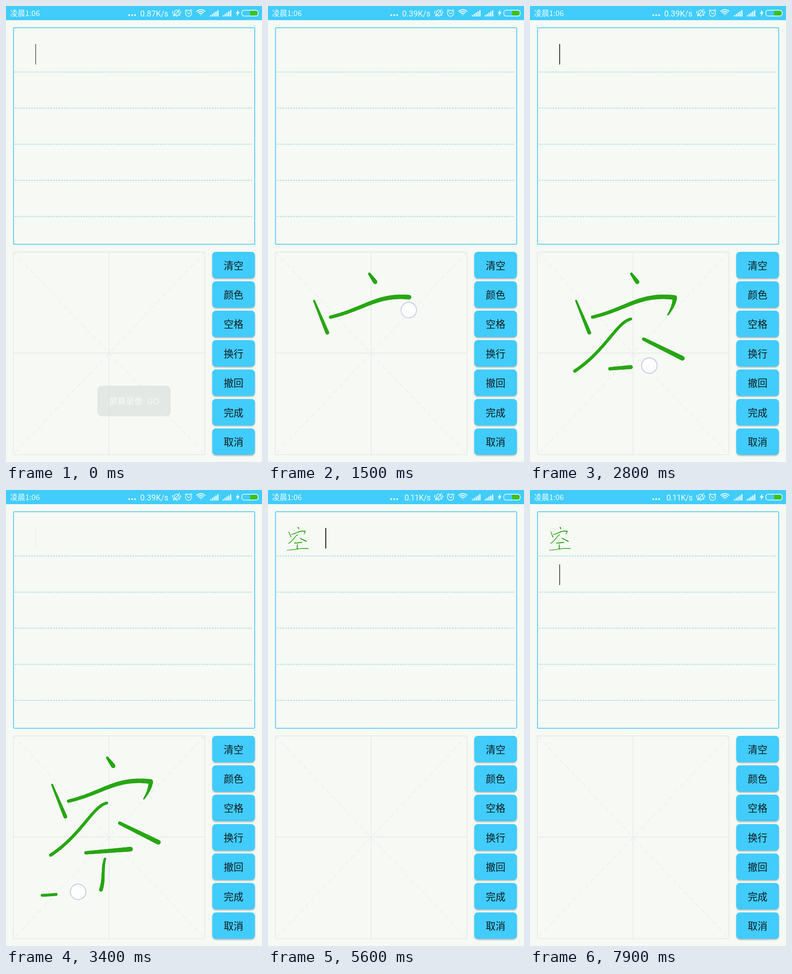
These frames come from a looping animation (561 px wide and 998 px high, 8000 ms). An HTML page with a canvas:

```html
<!DOCTYPE html>
<html lang="zh-CN">
<head>
<meta charset="utf-8">
<title>手写输入</title>
<style>
html, body { margin: 0; width: 561px; height: 998px; overflow: hidden; background: #f6f9f4; }
canvas { display: block; }
</style>
</head>
<body>
<canvas id="stage" width="561" height="998"></canvas>
<script>
const ctx = document.getElementById('stage').getContext('2d');
const CJK = '"Noto Sans CJK SC", "Noto Sans CJK", sans-serif';
const PAGE = '#f6f9f4', INK = '#28a614', BLUE = '#41ccfb', WHITE = '#f4fcff';
const LOOP = 8000, STEP = 100, INK_LAG = 70;
const COMMIT = 5000, NEWLINE = 6800;

// A pen stroke is a Bezier curve over its key points; the width runs from w0 to w1.
const stroke = (start, end, w0, w1, ...points) => ({ start, end, w0, w1, points });
const strokes = [
  stroke(700, 830, 5, 9, [222, 586], [235, 604]),
  stroke(960, 1080, 4, 8, [101, 645], [130, 715]),
  stroke(1150, 1440, 7, 10, [137, 681], [215, 662], [240, 629], [317, 638]),
  stroke(1440, 1520, 10, 3, [317, 638], [317, 654], [302, 676]),
  stroke(1620, 2110, 6, 7, [221, 685], [190, 692], [165, 755], [98, 799]),
  stroke(2340, 2510, 7, 10, [249, 729], [334, 771]),
  stroke(2650, 2820, 7, 10, [175, 794], [273, 786]),
  stroke(2960, 3120, 5, 8, [217, 807], [210, 830], [216, 850], [208, 875]),
  stroke(3280, 3700, 6, 8, [79, 887], [160, 885], [290, 851], [361, 868])
];

const clamp = v => Math.max(0, Math.min(1, v));
const mix = (a, b, u) => a + (b - a) * u;

function bezier(points, u) {
  if (points.length === 1) return points[0];
  return bezier(points.slice(1).map(([x, y], i) => [mix(points[i][0], x, u), mix(points[i][1], y, u)]), u);
}

function line(points, color, width = 1, dash = []) {
  ctx.strokeStyle = color;
  ctx.lineWidth = width;
  ctx.setLineDash(dash);
  ctx.beginPath();
  points.forEach(([x, y]) => ctx.lineTo(x, y));
  ctx.stroke();
  ctx.setLineDash([]);
}

function box(x, y, w, h, r, fill, outline, width = 1) {
  ctx.beginPath();
  ctx.roundRect(x, y, w, h, r);
  if (fill) { ctx.fillStyle = fill; ctx.fill(); }
  if (outline) { ctx.strokeStyle = outline; ctx.lineWidth = width; ctx.stroke(); }
}

function dot(x, y, r, color) {
  ctx.fillStyle = color;
  ctx.beginPath();
  ctx.arc(x, y, r, 0, 2 * Math.PI);
  ctx.fill();
}

function text(str, x, y, size, color, align = 'center', family = CJK) {
  ctx.font = `${size}px ${family}`;
  ctx.textAlign = align;
  ctx.fillStyle = color;
  ctx.fillText(str, x, y);
}

const bell = new Path2D('M369 17v-3a5 5 0 0 1 10 0v3l2 3h-14zM372 22.5h4M381 7l-14 16M366 11q-2 3 0 6M382 11q2 3 0 6');
const clock = new Path2D('M393.2 16a6.8 6.8 0 1 0 13.6 0a6.8 6.8 0 1 0-13.6 0M397 14l3 3 4-2M392 11l4-3.5M404 7.5l4 3.5');
const bolt = new Path2D('M509 8l-5.5 8.5h3.5l-1.5 6.5 6.5-9.5h-3.7z');

function drawStatus(t) {
  ctx.fillStyle = BLUE;
  ctx.fillRect(0, 0, 561, 31);
  text('凌晨1:06', 9, 22, 16.5, WHITE, 'left');
  const rate = t < 400 ? '0.87' : t < 4400 ? '0.39' : '0.11';
  ctx.letterSpacing = rate === '0.11' ? '-0.7px' : '0px';
  text(rate + 'K/s', 356, 22.5, 17.7, WHITE, 'right', 'Roboto, sans-serif');
  ctx.letterSpacing = '0px';

  for (let i = 0; i < 3; i++) dot(270 + i * 6.5, 20, 2, WHITE);
  ctx.strokeStyle = ctx.fillStyle = WHITE;
  ctx.lineWidth = 1.4;
  ctx.stroke(bell);
  ctx.stroke(clock);
  ctx.fill(bolt);

  // wifi
  ctx.lineWidth = 2.2;
  for (let r = 1; r <= 13; r += 4) {
    ctx.beginPath();
    ctx.arc(427, 21, r, -Math.PI * 0.76, -Math.PI * 0.24);
    ctx.stroke();
  }

  // signal bars
  for (const x of [447, 475])
    for (let i = 0; i < 5; i++) ctx.fillRect(x + i * 4, 20 - i * 2.7, 2.6, 3 + i * 2.7);

  // battery
  box(516.7, 9.2, 36, 12.8, 5, null, WHITE, 1.4);
  box(535, 10.8, 16.3, 9.6, [0, 4, 4, 0], '#3fc110');
}

function drawPaper() {
  box(16.5, 47.5, 528.5, 474, 2, null, '#31c0f4', 1.5);
  for (let y = 144.5; y < 500; y += 79) line([[19, y], [541, y]], '#8fdce0', 1.3, [4, 2]);
}

function drawGrid() {
  const soft = '#dde2e3';
  box(16, 538.5, 420, 443.5, 1, null, '#d9dfe3');
  line([[226, 538], [226, 982]], soft);
  line([[16, 759.5], [436, 759.5]], soft);
  line([[16, 538], [436, 982]], soft, 0.9, [11, 7]);
  line([[436, 538], [16, 982]], soft, 0.9, [11, 7]);
}

function drawButtons() {
  ['清空', '颜色', '空格', '换行', '撤回', '完成', '取消'].forEach((label, i) => {
    const y = 538 + i * 64.4;
    ctx.shadowColor = 'rgba(0,0,0,.26)';
    ctx.shadowBlur = 3;
    ctx.shadowOffsetY = 2;
    box(452, y, 93.5, 58, 8, BLUE);
    ctx.shadowColor = 'transparent';
    text(label, 498.7, y + 37.5, 21.5, '#12181c');
  });
}

function drawInk({ points, w0, w1 }, progress) {
  const steps = 60;
  ctx.lineCap = 'round';
  for (let i = 0; i < steps * progress; i++) {
    const from = i / steps, to = Math.min(progress, (i + 1) / steps);
    line([bezier(points, from), bezier(points, to)], INK, mix(w0, w1, to));
  }
  ctx.lineCap = 'butt';
}

function drawTouch([x, y], sinceRelease) {
  ctx.globalAlpha = sinceRelease <= 0 ? 1 : clamp(0.65 - sinceRelease / 200);
  dot(x, y, 17, 'rgba(255,255,255,.8)');
  ctx.strokeStyle = '#c6cde6';
  ctx.lineWidth = 2;
  ctx.stroke();
  ctx.globalAlpha = 1;
}

function drawWriting(t) {
  if (t >= COMMIT) {
    ctx.save();
    ctx.translate(28.7, -16.4);
    ctx.scale(0.166, 0.167);
    strokes.forEach(s => drawInk(s, 1));
    ctx.restore();
  } else {
    const progress = (s, time) => clamp((time - s.start) / (s.end - s.start));
    strokes.forEach(s => drawInk(s, progress(s, t - INK_LAG)));
    const current = strokes.findLast(s => s.start <= t);
    if (current) drawTouch(bezier(current.points, progress(current, t)), t - current.end);
  }
  if (t >= NEWLINE - 150) drawTouch([500, 762], t - NEWLINE + 20);
}

function drawCaret(t) {
  const phase = (t + 480) % 1000 / 1000;
  ctx.globalAlpha = (1 + Math.cos(Math.PI * phase)) / 2;
  ctx.fillStyle = '#111';
  ctx.fillRect(t >= COMMIT && t < NEWLINE ? 125.5 : 64, t < NEWLINE ? 83 : 163, 2, 45);
  ctx.globalAlpha = 1;
}

function drawToast(t) {
  ctx.globalAlpha = clamp(1 - t / 300);
  box(200, 831, 161, 67, 10, 'rgba(200,204,206,.4)');
  text('屏幕录像: GO', 280.5, 872, 18.5, '#f6f8f6');
  ctx.globalAlpha = 1;
}

function frame(now) {
  const t = Math.floor(now % LOOP / STEP) * STEP;
  ctx.fillStyle = PAGE;
  ctx.fillRect(0, 0, 561, 998);
  drawStatus(t);
  drawPaper();
  drawGrid();
  drawButtons();
  drawWriting(t);
  drawCaret(t);
  drawToast(t);
  requestAnimationFrame(frame);
}
requestAnimationFrame(frame);
</script>
</body>
</html>
```
